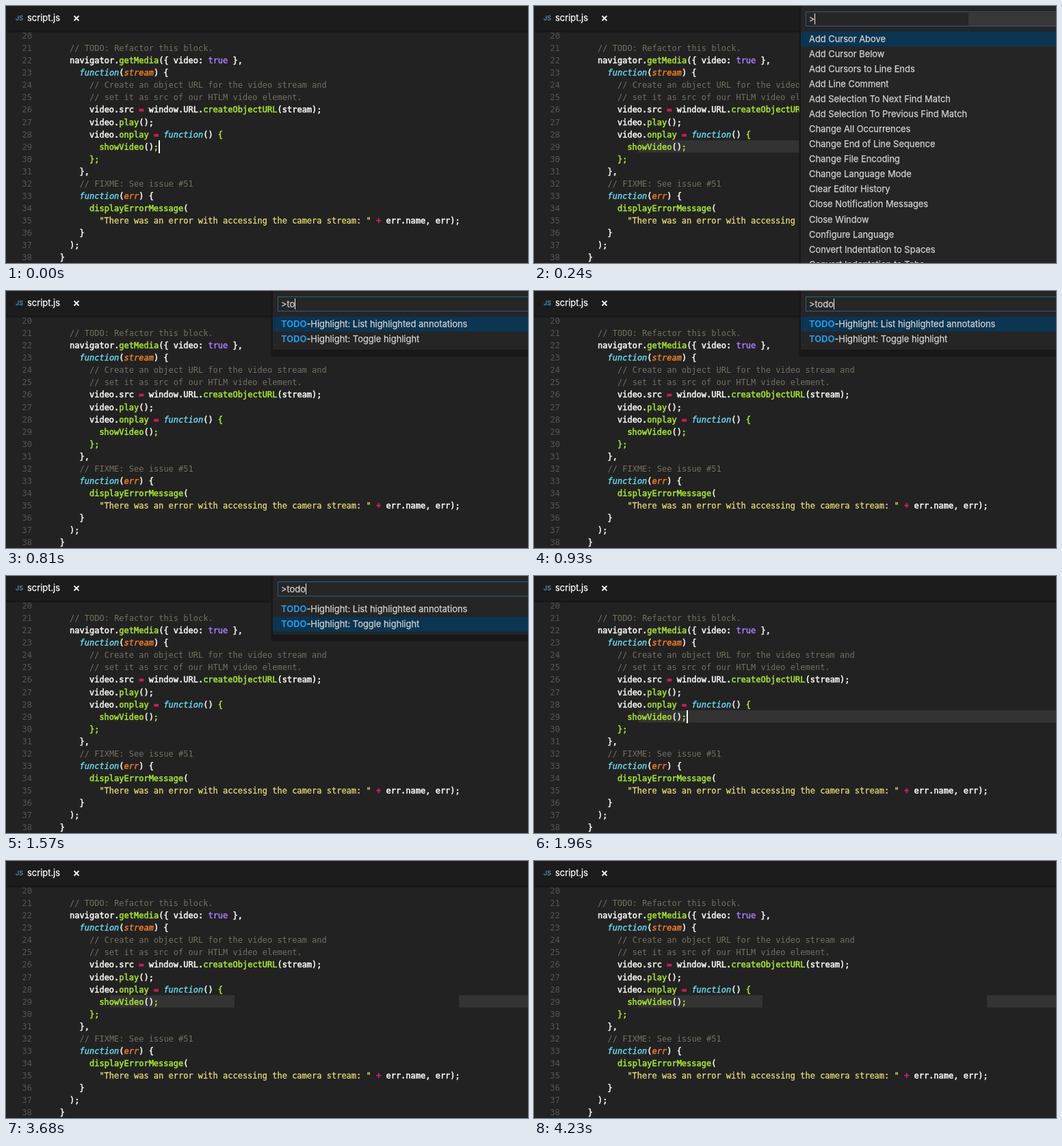
An HTML page for the animation above (4330 ms loop, 763 by 377 pixels).

```html
<!DOCTYPE html>
<html lang="en">
<head>
<meta charset="utf-8">
<title>Editor with annotation highlighting</title>
<style>
  html, body { margin: 0; width: 100%; height: 100%; overflow: hidden; background: #222; }
  svg { display: block; width: 763px; height: 377px; }
  text { white-space: pre; }
  .code text { font: 12px "DejaVu Sans Mono", monospace; }
  .ui text { font: 400 12.9px Inter, sans-serif; fill: #d2d2d2; stroke: #d2d2d2; stroke-width: .25; }
  .ui .bright { fill: #fff; stroke: #fff; }
  .ui .icon { font-size: 9px; fill: #519aba; stroke: #519aba; }
  .ui .match { fill: #1f9bea; stroke: none; font-weight: 700; }
  .num { fill: #555; }
  .w { fill: #f6f6f2; stroke: #f6f6f2; stroke-width: .55; }
  .g { fill: #a6e22e; stroke: #a6e22e; stroke-width: .55; }
  .r { fill: #e8175d; stroke: #e8175d; stroke-width: .7; }
  .k { fill: #66d9ef; stroke: #66d9ef; stroke-width: .45; font-style: italic; }
  .o { fill: #ef7d2b; stroke: #ef7d2b; stroke-width: .45; font-style: italic; }
  .p { fill: #ae81ff; stroke: #ae81ff; stroke-width: .4; }
  .s { fill: #e6db74; stroke: #e6db74; stroke-width: .3; }
  .c { fill: #736f5f; }
</style>
</head>
<body>
<svg id="stage" viewBox="0 0 763 377">
  <defs>
    <linearGradient id="shade" x1="0" y1="0" x2="0" y2="1">
      <stop offset="0" stop-color="#141414"/>
      <stop offset="1" stop-color="#222"/>
    </linearGradient>
  </defs>
</svg>
<script>
const LOOP = 4330;
const LINE = 18.03;
const INDENT = 14.42;
const CHAR = 7.224;
const ROW = 22.07;

// Each entry: indent level, then "class~text" runs separated by "|".
const lines = [
  [0, ""],
  [1, "c~// |c~TODO:|c~ Refactor this block."],
  [1, "w~navigator.|g~getMedia|w~({ video: |p~true|w~ },"],
  [2, "k~function|w~(|o~stream|w~) {"],
  [3, "c~// Create an object URL for the video stream and"],
  [3, "c~// set it as src of our HTLM video element."],
  [3, "w~video.src |r~=|w~ window.URL.|g~createObjectURL|w~(stream);"],
  [3, "w~video.|g~play|w~();"],
  [3, "w~video.|g~onplay|w~ |r~=|w~ |k~function|w~() |g~{"],
  [4, "g~showVideo|w~()|g~;"],
  [3, "g~};"],
  [2, "w~},"],
  [2, "c~// |c~FIXME:|c~ See issue #51"],
  [2, "k~function|w~(|o~err|w~) {"],
  [3, "g~displayErrorMessage|w~("],
  [4, 's~"There was an error with accessing the camera stream: "|w~ |r~+|w~ err.name, err);'],
  [2, "w~}"],
  [1, "w~);"],
  [0, "w~}"]
];

const commands = [
  "Add Cursor Above", "Add Cursor Below", "Add Cursors to Line Ends", "Add Line Comment",
  "Add Selection To Next Find Match", "Add Selection To Previous Find Match",
  "Change All Occurrences", "Change End of Line Sequence", "Change File Encoding",
  "Change Language Mode", "Clear Editor History", "Close Notification Messages",
  "Close Window", "Configure Language", "Convert Indentation to Spaces",
  "Convert Indentation to Tabs"
];
const matches = ["-Highlight: List highlighted annotations", "-Highlight: Toggle highlight"];

const stage = document.getElementById("stage");

function add(parent, name, attrs = {}, content = "") {
  const node = document.createElementNS("http://www.w3.org/2000/svg", name);
  for (const key in attrs) node.setAttribute(key, attrs[key]);
  node.textContent = content;
  parent.appendChild(node);
  return node;
}
const rect = (parent, x, y, width, height, fill) =>
  add(parent, "rect", { x, y, width, height, fill });
const show = (node, visible) => node.setAttribute("display", visible ? "inline" : "none");
const codeX = level => 78.7 + INDENT * level;
const codeY = index => 48.3 + LINE * index;
const rowY = index => 52.7 + ROW * index;

// Editor
rect(stage, 0, 0, 763, 377, "#222");
rect(stage, 0, 36, 763, 4, "url(#shade)");
const bandLeft = rect(stage, 152, 197, 1, 18, "#333");
const bandRight = rect(stage, 398, 197, 1, 18, "#333");
const code = add(stage, "g", { class: "code" });
lines.forEach(([level, runs], i) => {
  add(code, "text", { x: 23.5, y: codeY(i), class: "num" }, String(20 + i));
  const text = add(code, "text", { x: codeX(level), y: codeY(i) });
  for (const run of runs.split("|")) {
    const [style, value] = run.split("~");
    if (value) add(text, "tspan", { class: style }, value);
  }
});
const cursor = rect(stage, 223, 197, 2, 19, "#fff");

const tags = add(stage, "g", { class: "code" });
function addTag(label, index, level, color) {
  const x = codeX(level) + 3 * CHAR;
  rect(tags, x, 53 + LINE * (index - 1), label.length * CHAR, 18, color);
  add(tags, "text", { x, y: codeY(index), class: "w" }, label);
}
addTag("TODO:", 1, 1, "#f1b32f");
addTag("FIXME:", 12, 2, "#e34f8d");

// Tab bar
const tab = add(stage, "g", { class: "ui" });
rect(tab, 0, 0, 763, 36, "#1c1c1c");
add(tab, "text", { x: 14, y: 21, class: "icon" }, "JS");
add(tab, "text", { x: 31, y: 22, class: "bright" }, "script.js");
add(tab, "path", { d: "M99.5 14.5l7 7m0-7l-7 7", stroke: "#f2f2f2", "stroke-width": 1.9 });

// Command palette
const palette = add(stage, "g", { class: "ui" });
const shadow = add(palette, "rect", { x: 387.5, y: -12, width: 390, rx: 4, fill: "#181818" });
const panel = rect(palette, 390, -12, 390, 400, "#252526");
add(palette, "rect", { x: 397.5, y: 8.5, width: 380, height: 21, fill: "#262626", stroke: "#285e82" });
const inputRest = rect(palette, 635, 10, 128, 19, "#383838");
const query = add(palette, "text", { x: 402, y: 23.7 });
const caret = rect(palette, 410, 11, 1, 16, "#eee");
const selection = rect(palette, 390, 37.5, 373, ROW, "#0b3550");
const allRows = add(palette, "g");
const foundRows = add(palette, "g");
commands.forEach((name, i) => add(allRows, "text", { x: 402, y: rowY(i) }, name));
matches.forEach((rest, i) => {
  const text = add(foundRows, "text", { x: 402, y: rowY(i) });
  add(text, "tspan", { class: "match" }, "TODO");
  add(text, "tspan", {}, rest);
});

function setBand(node, from, to) {
  node.setAttribute("x", from);
  node.setAttribute("width", Math.max(0, to - from));
}

function render(t) {
  const within = (from, to) => t >= from && t < to;
  const filtered = t >= 810;

  show(palette, within(120, 1840));
  show(allRows, !filtered);
  show(foundRows, filtered);
  show(inputRest, !filtered);
  panel.setAttribute("height", filtered ? 98 : 400);
  shadow.setAttribute("height", filtered ? 108 : 400);
  selection.setAttribute("y", t >= 1570 ? 37.5 + ROW : 37.5);
  query.textContent = t < 810 ? ">" : t < 930 ? ">to" : ">todo";
  caret.setAttribute("x", t < 810 ? 410 : t < 930 ? 422 : 438);

  show(cursor, t < 120 || within(1840, 2350) || within(2960, 3410));
  show(tags, within(2110, 3680));

  show(bandLeft, within(120, 810) || t >= 1840);
  show(bandRight, t >= 1840);
  setBand(bandLeft, 152, t < 2110 ? 398 : t < 3680 ? 391 : 334);
  setBand(bandRight, t < 3680 ? 398 : 662, 763);
}

const start = performance.now();
function tick() {
  render((performance.now() - start) % LOOP);
  requestAnimationFrame(tick);
}
tick();
</script>
</body>
</html>
```
